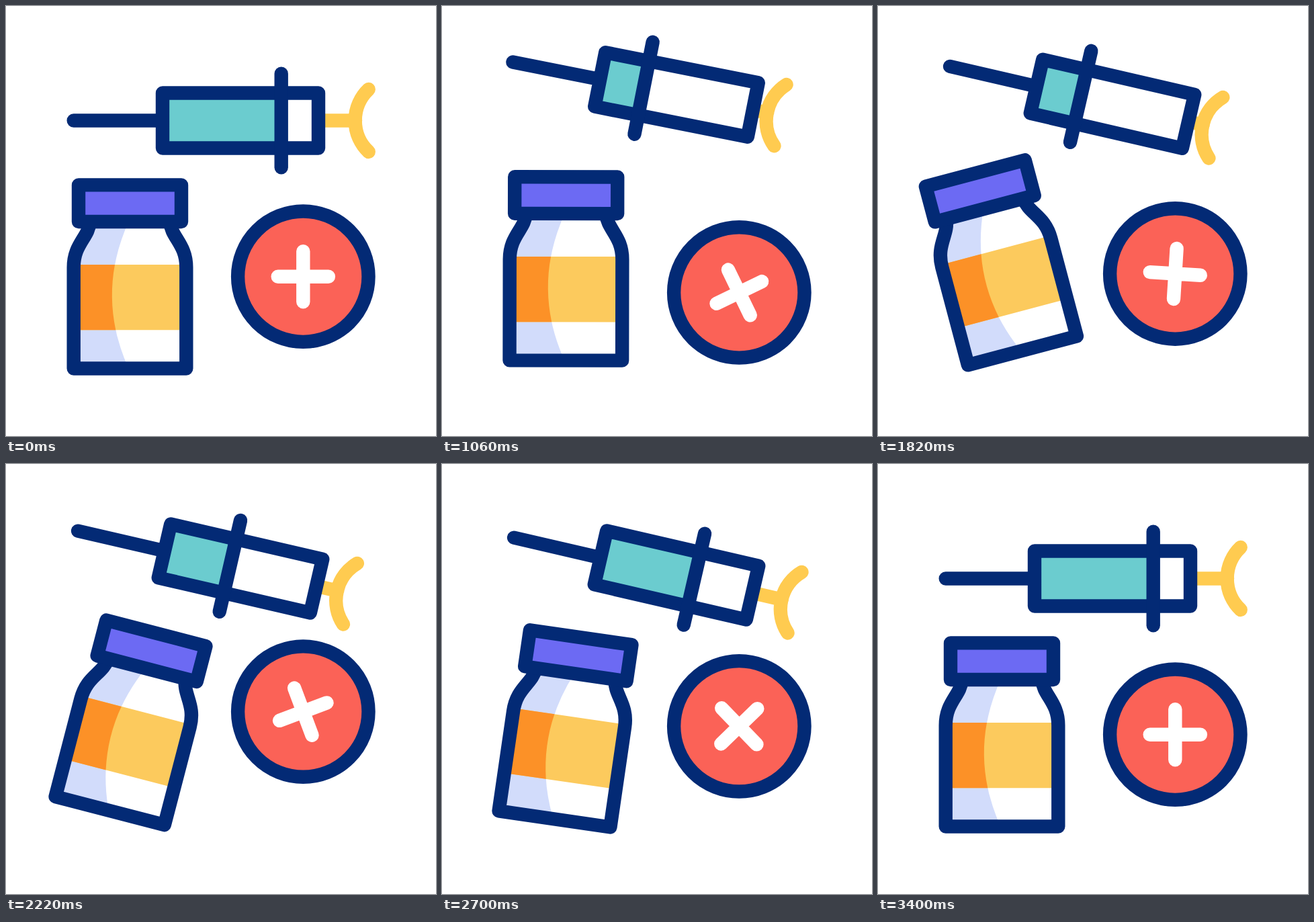
An HTML page for the animation above (3.6 s loop, 640 px wide and 640 px high).

```html
<!DOCTYPE html>
<html lang="en">
<head>
<meta charset="utf-8">
<title>Vaccine icons</title>
<style>
  html, body { margin: 0; width: 100%; height: 100%; overflow: hidden; background: #fff; }
  svg { display: block; width: 100vw; height: 100vh; }
  .line { fill: none; stroke: #032a75; stroke-width: 20.4; stroke-linecap: round; stroke-linejoin: round; }
  .white { fill: #fff; }
</style>
</head>
<body>
<svg viewBox="0 0 640 640">
  <g id="syringe">
    <path id="handle" class="line" style="stroke:#ffcb50" d="M440 170.5H520M539.7 124A64 64 0 0 0 539.7 217"/>
    <path class="white" d="M233 129.5H465V211.5H233Z"/>
    <rect id="liquid" x="233" y="129.5" height="82" fill="#6bcccf"/>
    <path class="line" d="M233 129.5H465V211.5H233ZM100.7 170.5H233"/>
    <path id="bar" class="line" d="M409.7 100.7V240.3"/>
  </g>
  <g id="bottle">
    <path class="white" d="M125 321C123 345 100.7 354 100.7 389V539.5H268.3V389C268.3 354 246 345 244 321Z"/>
    <path fill="#d2dcfb" d="M125 321C123 345 100.7 354 100.7 389V539.5H182.5Q133 431 182.5 321Z"/>
    <path fill="#fcca5d" d="M101 385H268V482.3H101Z"/>
    <path fill="#fc9127" d="M101 385H162Q153 433 163.3 482.3H101Z"/>
    <path class="line" d="M125 321C123 345 100.7 354 100.7 389V539.5H268.3V389C268.3 354 246 345 244 321"/>
    <path class="line" style="fill:#6c6af3" d="M108 266.4H261V321H108Z"/>
  </g>
  <g id="badge">
    <circle class="line" style="fill:#fb6257" cx="442.3" cy="402.7" r="97.2"/>
    <path id="cross" class="line" style="stroke:#fff" d="M404.7 402.7H479.9M442.3 365.1V440.3"/>
  </g>
</svg>
<script>
const LOOP = 3600, START = 200, STEP = 20, END = 160;

// Keys are [step, value] pairs, eased in and out between neighbours.
const tracks = {
  syringeY: [[0, 0], [30, -39.8], [152, 0]],
  syringeTurn: [[0, 0], [56, 13], [134, 13], [160, 0]],
  push: [[0, 0], [56, -128], [160, 0]],
  bottleY: [[0, 0], [83, -22.7], [160, 0]],
  bottleTurn: [[0, 0], [30, -15], [56, 15], [82, -15], [100, 15], [115, -15], [129.5, 15], [145, -15], [160, 0]],
  badgeY: [[0, 0], [30, -19], [56, 66], [82, -4.5], [108, -40.4], [134, -1.8], [160, 0]],
  crossTurn: [[0, 0], [160, 360]]
};

function valueAt(keys, u) {
  const i = keys.findIndex(key => key[0] >= u);
  if (i < 0) return keys[keys.length - 1][1];
  if (i === 0) return keys[0][1];
  const [u0, v0] = keys[i - 1], [u1, v1] = keys[i];
  const s = (u - u0) / (u1 - u0);
  return v0 + (v1 - v0) * s * s * (3 - 2 * s);
}

const el = id => document.getElementById(id);
const parts = Object.fromEntries(
  ['syringe', 'handle', 'liquid', 'bar', 'bottle', 'badge', 'cross'].map(id => [id, el(id)]));

function place(part, x, y, turn = 0, cx = 0, cy = 0) {
  part.setAttribute('transform', `translate(${x} ${y}) rotate(${turn} ${cx} ${cy})`);
}

function draw(now) {
  const u = Math.min(END, Math.max(0, (now % LOOP - START) / STEP));
  const at = name => valueAt(tracks[name], u);
  const push = at('push');
  place(parts.syringe, 0, at('syringeY'), at('syringeTurn'), 349, 170.5);
  place(parts.bar, push, 0);
  place(parts.handle, push * 0.3, 0);
  parts.liquid.setAttribute('width', 176.7 + push);
  place(parts.bottle, 0, at('bottleY'), at('bottleTurn'), 184.5, 421);
  place(parts.badge, 0, at('badgeY'));
  place(parts.cross, 0, 0, at('crossTurn'), 442.3, 402.7);
}

const begin = performance.now();
function tick() {
  draw(performance.now() - begin);
  requestAnimationFrame(tick);
}
tick();
</script>
</body>
</html>
```
